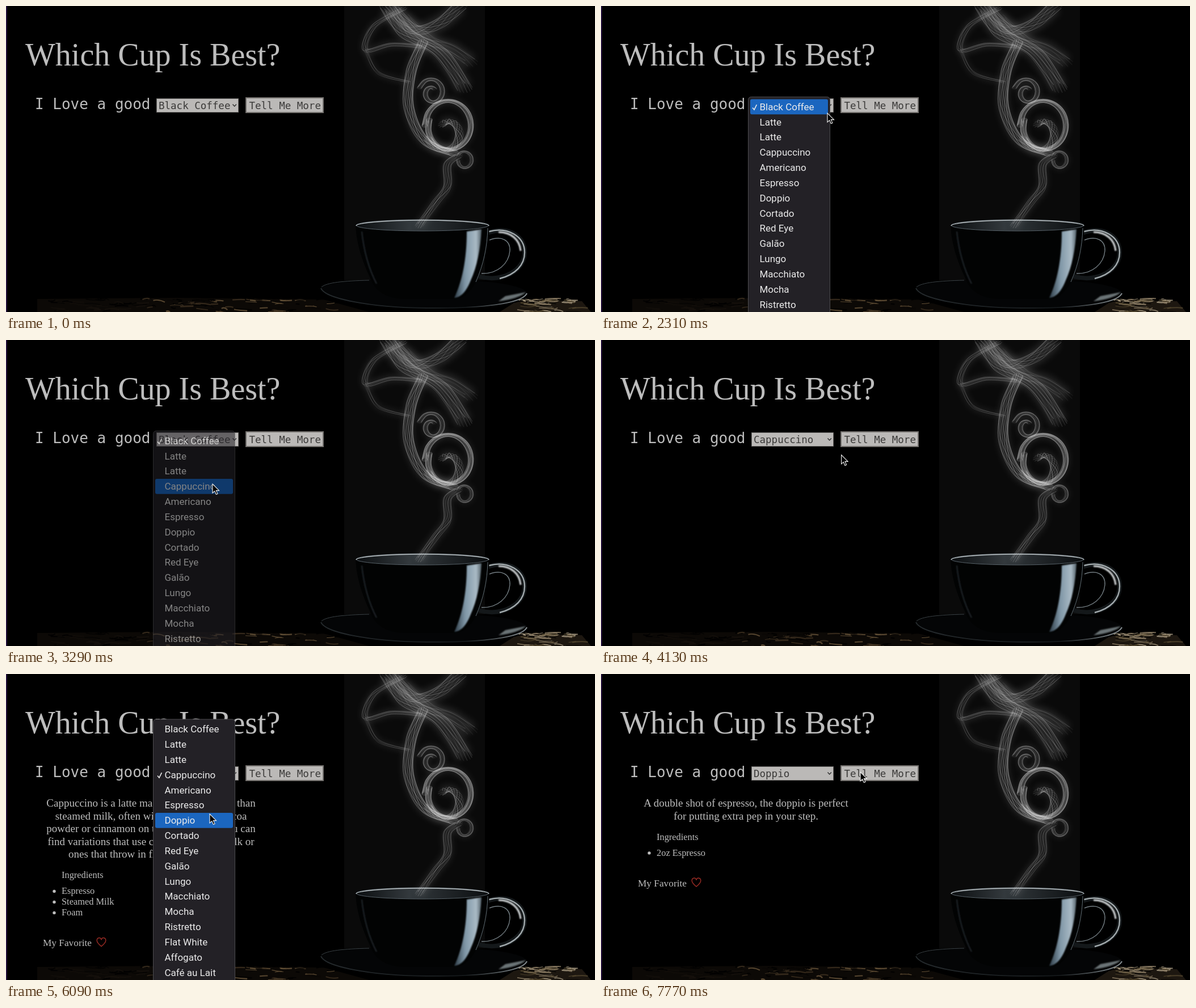
An HTML page for the animation above (8000 ms loop, 1038 by 540 pixels).

```html
<!DOCTYPE html>
<html lang="en">
<head>
<meta charset="utf-8">
<title>Coffee picker</title>
<style>
  html, body { margin: 0; width: 100%; height: 100%; overflow: hidden; background: #000; }
  svg { display: block; width: 1038px; height: 540px; }
  text { white-space: pre; }
  .serif { font-family: "Liberation Serif", "Times New Roman", serif; fill: #bdbdbd; }
  .mono { font-family: "DejaVu Sans Mono", monospace; }
  .ctl { font-size: 17.5px; fill: #3b3a39; }
  .item { font: 17px Roboto, Inter, sans-serif; fill: #ebebeb; }
  .body { font-size: 19px; text-anchor: middle; }
  .list { font-size: 16.4px; }
</style>
</head>
<body>
<svg viewBox="0 0 1038 540" xmlns="http://www.w3.org/2000/svg">
  <defs>
    <filter id="glow" x="-50%" y="-50%" width="200%" height="200%"><feGaussianBlur stdDeviation="6"/></filter>
    <filter id="edge" x="-20%" y="-20%" width="140%" height="140%"><feGaussianBlur stdDeviation="1"/></filter>
    <linearGradient id="shine" x1="0" x2="1">
      <stop offset="0" stop-color="#2c3a45"/><stop offset=".4" stop-color="#7f96a6"/>
      <stop offset=".8" stop-color="#a9bac5"/><stop offset="1" stop-color="#56646d"/>
    </linearGradient>
    <linearGradient id="inside" x1="0" x2="1">
      <stop offset="0" stop-color="#0b0e10"/><stop offset=".4" stop-color="#33393d"/><stop offset="1" stop-color="#0b0e10"/>
    </linearGradient>
    <linearGradient id="dish" x1="0" x2="1">
      <stop offset="0" stop-color="#262b2e"/><stop offset=".7" stop-color="#15191b"/><stop offset="1" stop-color="#8a9296"/>
    </linearGradient>
  </defs>

  <rect width="1038" height="540"/>
  <rect x="596" width="248" height="484" fill="#0a0a0a"/>
  <rect width="2" height="540" fill="#26143f"/>

  <g id="wood">
    <path d="M55 517L300 515L560 518L640 540H55Z" fill="#0c0906"/>
    <path d="M895 524L925 517L1015 521L1031 540H870Z" fill="#1d1710"/>
  </g>

  <g id="cup" fill="none">
    <path d="M555 498C560 486 640 482 736 482S910 490 918 506C910 526 840 533 740 533S560 518 555 498Z" fill="#040506"/>
    <path d="M555 498C562 516 640 532 740 533S910 525 918 507" stroke="url(#dish)" stroke-width="2"/>
    <path d="M556 496C565 488 595 485 640 484" stroke="#3b4246"/>
    <path d="M880 512L916 505Q905 516 868 521Z" fill="#6b7376" filter="url(#edge)"/>
    <path d="M850 400C886 388 914 406 914 435C914 466 876 489 833 477" stroke="#14181a" stroke-width="8"/>
    <path d="M851 398C884 389 914 406 914 435C914 457 898 474 870 481" stroke="#a3abae" stroke-width="2.4"/>
    <path d="M868 399C890 399 905 412 907 432" stroke="#d8dcde" stroke-width="3" filter="url(#edge)"/>
    <path d="M852 413C873 405 889 413 888 432C886 455 866 473 838 472" stroke="#737d82" stroke-width="1.4"/>
    <path d="M616 386C618 425 630 455 645 487C656 508 676 517 705 517H790C812 516 825 497 836 470C846 440 851 415 852 386Z" fill="#020303"/>
    <path d="M627 398C631 435 640 465 653 490" stroke="#24292d" stroke-width="2" filter="url(#edge)"/>
    <path d="M812 398L838 394C836 430 830 460 819 484C812 502 803 514 790 515C803 488 812 450 812 398Z" fill="url(#shine)" filter="url(#edge)"/>
    <path d="M849 392C848 425 842 455 828 487" stroke="#606c73"/>
    <ellipse cx="734" cy="387" rx="117" ry="10" fill="url(#inside)" stroke="#566067"/>
    <path d="M617 388A117 10 0 0 1 851 388" stroke="#b9c0c3" stroke-width="1.6"/>
  </g>
  <g id="steam" fill="none" stroke="#dedede"></g>

  <text class="serif" x="34" y="105" font-size="56">Which Cup Is Best?</text>
  <text class="mono" x="51" y="182" font-size="26" fill="#bdbdbd">I Love a good</text>
  <rect x="265.5" y="163.5" width="144" height="24" fill="#bbb9b7" stroke="#6f6d6b"/>
  <text id="choice" class="mono ctl" x="269" y="182"></text>
  <path d="M399.5 173.5l3.2 3.4l3.2-3.4" fill="none" stroke="#333" stroke-width="1.5"/>
  <rect x="423" y="162" width="136" height="26" fill="#bbb9b7" stroke="#73706d" stroke-width="2"/>
  <text class="mono ctl" x="428.5" y="182">Tell Me More</text>

  <g id="infos"></g>
  <g id="menus"></g>
  <path id="cursor" d="M0 0V16L3.7 12.6L6.4 18.6L9 17.4L6.4 11.6H11.5Z" fill="#000" stroke="#f2f2f2" stroke-width="1.1"/>
</svg>

<script>
const $ = id => document.getElementById(id);
const LOOP = 8000, STEP = 70, ROW = 26.83, LINE = 22.5;

let seed = 11;
const rnd = (a, b) => {
  seed = (seed * 16807) % 2147483647;
  return a + (b - a) * seed / 2147483647;
};

// Smooth curve through points
function spline(p) {
  let d = `M${p[0]}`;
  for (let i = 1; i < p.length; i++) {
    const a = p[i - 1], b = p[i], before = p[i - 2] || a, after = p[i + 1] || b;
    const c1 = a.map((v, k) => v + (b[k] - before[k]) / 6);
    const c2 = b.map((v, k) => v - (after[k] - a[k]) / 6);
    d += `C${c1} ${c2} ${b}`;
  }
  return d;
}

// Strands wind around a spine like threads on a tube.
function wisp(points, width, strands, alpha) {
  let s = `<path d="${spline(points)}" stroke-width="${width * 2.2}" opacity=".12" filter="url(#glow)"/>`;
  for (let i = 0; i < strands; i++) {
    const line = points.map(([x, y], j) => {
      const a = i * 2 * Math.PI / strands + j * .7;
      return [x + width * Math.cos(a), y + width * .6 * Math.sin(a)];
    });
    s += `<path d="${spline(line)}" stroke-width="${rnd(.5, 1.5)}" opacity="${alpha * rnd(.4, 1.2)}"/>`;
  }
  return s;
}

// Points of a spiral that shrinks from r to r * end
function swirl(cx, cy, r, end, from, turns) {
  return Array.from({ length: 13 }, (_, i) => {
    const u = i / 12, a = (from + turns * u) * 2 * Math.PI, q = r * (1 + (end - 1) * u);
    return [cx + q * Math.cos(a), cy + q * 1.1 * Math.sin(a)];
  });
}

$('steam').innerHTML =
  wisp([[728, 388], [758, 346], [778, 318], [778, 280], [798, 264]], 7, 10, .25)
  + wisp([[735, 64], [714, 115], [710, 180], [738, 238], [790, 260]], 9, 14, .3)
  + wisp(swirl(780, 212, 42, .85, .5, 1.05), 5, 14, .32)
  + wisp(swirl(776, 222, 34, .4, .45, -.8), 7, 9, .28)
  + wisp(swirl(808, 272, 14, .8, .6, .9), 3, 6, .3)
  + wisp(swirl(751, 153, 24, .3, .55, 1.3), 4, 9, .28)
  + wisp([[702, 4], [648, 36], [634, 78], [680, 68], [735, 72]], 5, 7, .2)
  + wisp([[634, 78], [656, 118], [710, 134]], 3, 4, .2)
  + wisp([[672, 0], [705, 48], [765, 82], [808, 145]], 14, 14, .22)
  + wisp([[680, 5], [720, 42], [765, 30], [800, 0]], 13, 12, .2)
  + wisp([[700, 20], [745, 60], [785, 75], [820, 100]], 12, 8, .16);

function grain(n, x0, x1, colors) {
  let s = '';
  for (let i = 0; i < n; i++) {
    const y = 517 + 23 * rnd(0, 1) ** 1.4, w = rnd(6, 30);
    s += `<path d="M${rnd(x0, x1)} ${y}q${w / 2} ${rnd(-4, 4)} ${w} ${rnd(-2, 3)}" fill="none" stroke="${colors[i % colors.length]}" stroke-width="${rnd(.8, 2.6)}" opacity=".8"/>`;
  }
  return s;
}
$('wood').innerHTML += grain(40, 60, 260, ['#000', '#17120c'])
  + grain(80, 230, 580, ['#000', '#3f3120', '#0a0705', '#6a563b'])
  + grain(60, 900, 998, ['#8c7d64', '#080604', '#55482f', '#b3a58b']);

// Drink descriptions
const label = (cls, x, y, s) => `<text class="serif ${cls}" x="${x}" y="${y}">${s}</text>`;

function info(lines, parts) {
  const top = 247.5 + lines.length * LINE;
  const partY = i => top + 28 + i * 19;
  const fav = partY(parts.length - 1) + 54;
  return '<g>' + lines.map((s, i) => label('body', 255.5, 234 + i * LINE, s)).join('')
    + label('list', 98, top, 'Ingredients')
    + parts.map((s, i) => `<circle cx="85" cy="${partY(i) - 4.6}" r="2.7" fill="#bdbdbd"/>`
      + label('list', 98, partY(i), s)).join('')
    + `<text class="serif" x="65" y="${fav}" font-size="17.3">My Favorite</text>`
    + `<path transform="translate(168 ${fav})" d="M0 .6C-5-3.5-7.8-6.5-7.8-9.8C-7.8-15.2-2-16-0-11.5C2-16 7.8-15.2 7.8-9.8C7.8-6.5 5-3.5 0 .6Z" fill="none" stroke="#952a23" stroke-width="1.5"/></g>`;
}

$('infos').innerHTML = info([
  'Cappuccino is a latte made with more foam than',
  'steamed milk, often with a sprinkle of cocoa',
  'powder or cinnamon on top. Sometimes you can',
  'find variations that use cream instead of milk or',
  'ones that throw in flavor shot, as well.'
], ['Espresso', 'Steamed Milk', 'Foam']) + info([
  'A double shot of espresso, the doppio is perfect',
  'for putting extra pep in your step.'
], ['2oz Espresso']);

// Drop-down lists
const drinks = ['Black Coffee', 'Latte', 'Latte', 'Cappuccino', 'Americano', 'Espresso', 'Doppio', 'Cortado',
  'Red Eye', 'Galão', 'Lungo', 'Macchiato', 'Mocha', 'Ristretto', 'Flat White', 'Affogato', 'Café au Lait'];
const menus = [
  { open: 1540, pick: 3080, checked: 0 },
  { open: 5460, pick: 6440, checked: 3 }
];

$('menus').innerHTML = menus.map(m => {
  m.top = 164.4 - m.checked * ROW;
  return `<g><rect x="259.5" y="${m.top - 4}" width="144" height="600" rx="5" fill="#232126" stroke="#4c4b4e"/>`
    + `<rect x="263" width="137" height="${ROW}" rx="3" fill="#1b66bf"/>`
    + drinks.map((s, i) => `<text class="item" x="279.5" y="${m.top + i * ROW + 19.4}">${s}</text>`).join('')
    + '<path d="M267 179.5l3 3.6l4.4-9" fill="none" stroke="#ebebeb" stroke-width="1.6"/></g>';
}).join('');
menus.forEach((m, i) => {
  m.el = $('menus').children[i];
  m.bar = m.el.children[1];
});

// Pointer moves; it rests in between
const moves = [
  { from: 70, to: 1190, x: 399, y: 189 },
  { from: 2310, to: 2940, x: 364, y: 254 },
  { from: 3920, to: 4270, x: 456, y: 175 },
  { from: 4970, to: 5390, x: 391, y: 179 },
  { from: 5950, to: 6090, x: 359, y: 247 },
  { from: 7280, to: 7700, x: 457, y: 173 }
];

function pointer(t) {
  let x = 640, y = 545;
  for (const m of moves) {
    const u = Math.min(1, Math.max(0, (t - m.from) / (m.to - m.from)));
    const k = u * u * (3 - 2 * u);
    x += (m.x - x) * k;
    y += (m.y - y) * k;
  }
  return [x, y];
}

const show = (el, on) => el.setAttribute('visibility', on ? 'visible' : 'hidden');

function draw(time) {
  const t = Math.floor(time / STEP) * STEP;
  const [x, y] = pointer(t);
  $('cursor').setAttribute('transform', `translate(${x} ${y})`);

  for (const m of menus) {
    const since = t - m.pick;
    const fade = Math.min(1, Math.max(0, (since - STEP) / 700));
    const row = Math.max(0, Math.floor((y + 1 - m.top) / ROW));
    show(m.el, t >= m.open && fade < 1);
    m.el.setAttribute('opacity', (1 - fade) ** 2.6);
    m.bar.setAttribute('y', m.top + row * ROW);
    m.bar.setAttribute('opacity', since >= 0 && since < STEP ? 0 : 1);
  }

  const picked = menus.filter(m => t >= m.pick + 560).length;
  $('choice').textContent = ['Black Coffee', 'Cappuccino', 'Doppio'][picked];
  const [first, second] = $('infos').children;
  show(first, t >= 4340 && t < 7700);
  show(second, t >= 7700);
}

let start;
function tick(now) {
  start ??= now;
  draw((now - start) % LOOP);
  requestAnimationFrame(tick);
}
draw(0);
requestAnimationFrame(tick);
</script>
</body>
</html>
```
